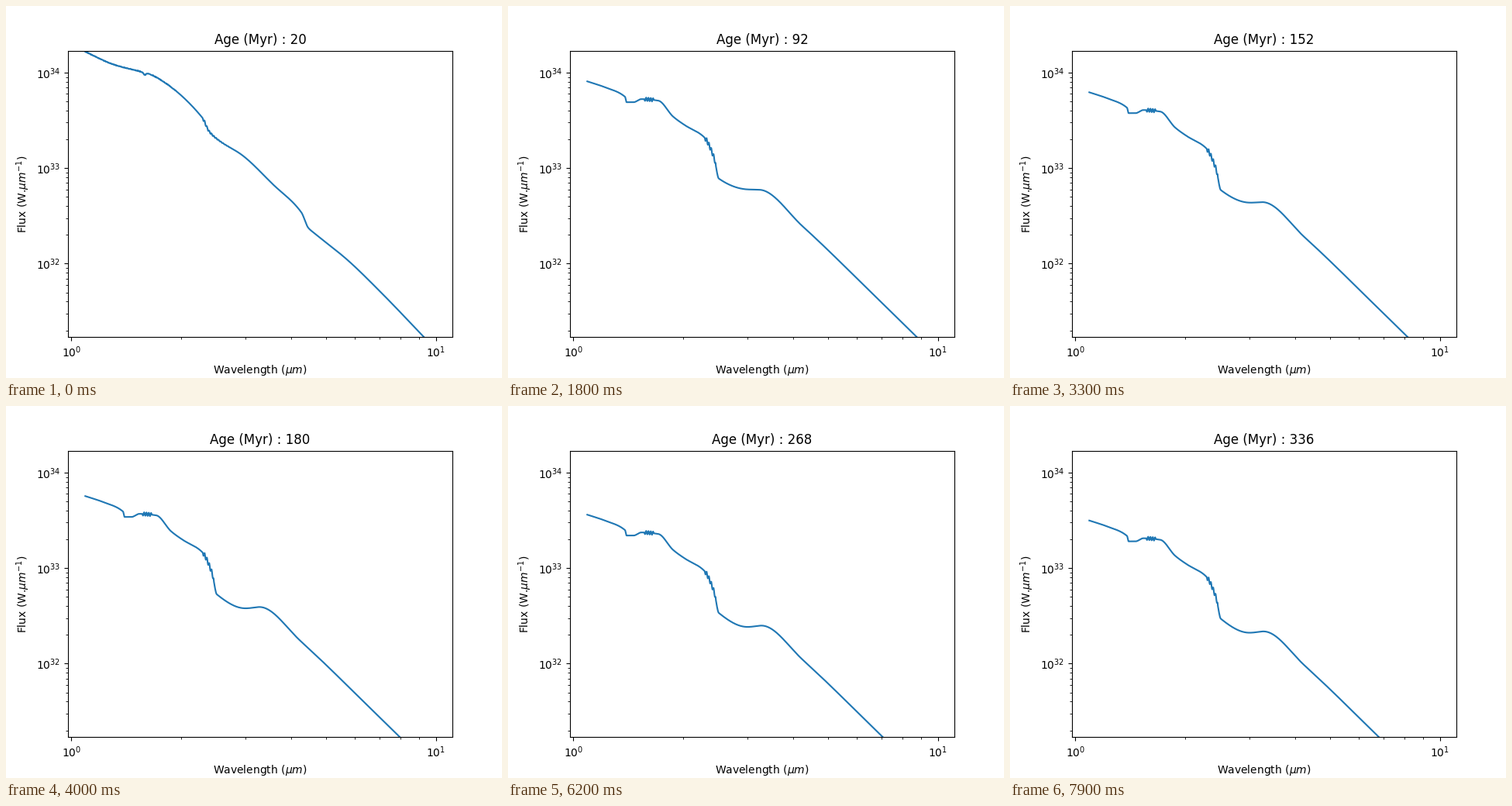
Animation of 640x480 px, one loop 8 s. Source, as a matplotlib script:

```python
import numpy as np
import matplotlib.pyplot as plt
from matplotlib.animation import FuncAnimation

FRAMES, STEP_MS = 80, 100
X0, DECADE_X = 84.3, 470.5   # screen x of 1 um, pixels per decade
Y0, DECADE_Y = 85.4, 123.2   # screen y of 1e34, pixels per decade

# Key points of the two stellar continua, in screen pixels
HOT = [(102, 111), (135, 127.5), (172, 143), (190, 150.5), (253, 205),
       (262, 223), (275, 235), (305, 254), (345, 292), (381, 327.5),
       (390, 347.5), (398, 354.5), (440, 388.5), (480, 427), (554, 504)]
COOL = [(102, 105), (126, 113), (151, 125), (153, 132), (162, 132),
        (172, 128), (194, 130), (213, 150.5), (228, 161.5), (253, 177),
        (266, 204), (272, 230.5), (309, 244.5), (325, 245), (380, 292),
        (480, 388.5), (554, 461)]

px = np.arange(102.3, 554, 0.5)


def smooth_curve(points):
    """Monotone cubic through the points, sampled at px."""
    x, y = np.array(points, float).T
    h, d = np.diff(x), np.diff(y) / np.diff(x)
    same = d[:-1] * d[1:] > 0
    inner = np.zeros(len(same))
    inner[same] = (2 * d[:-1] * d[1:])[same] / (d[:-1] + d[1:])[same]
    m = np.concatenate([d[:1], inner, d[-1:]])
    k = np.clip(np.searchsorted(x, px) - 1, 0, len(h) - 1)
    t = (px - x[k]) / h[k]
    return (y[k] + h[k] * t * (m[k] + t * (3 * d[k] - 2 * m[k] - m[k + 1]
            + t * (m[k] + m[k + 1] - 2 * d[k]))))


def bump(center, width):
    return np.exp(-((px - center) / width) ** 2)


def ripple(lo, hi, period=3):
    inside = (px >= lo) & (px <= hi)
    return inside * np.sin(2 * np.pi * (px - lo) / period)


def mix(a, b, w):
    return a + (b - a) * w


def smoothstep(t):
    t = np.clip(t, 0, 1)
    return t * t * (3 - 2 * t)


grain = np.random.default_rng(4).uniform(-0.4, 0.4, px.size) * (px < 220)
hot_base = (smooth_curve(HOT) + grain + 3 * bump(179, 2)
            + 2 * ripple(254, 288) * np.exp(-(px - 254) / 15))
hot_fall = 57.5 + 4.5 * np.tanh((px - 160) / 25)
cool_base = smooth_curve(COOL) + 2.2 * ripple(176, 188) + 3 * ripple(254, 268)
cool_dip = 5.5 * bump(305, 28)


def spectrum(i, age):
    young = 1 - np.log(age / 20) / np.log(64 / 20)
    hot = hot_base - hot_fall * max(young, 0)
    dim = np.interp(i, [20, 25, 40, 62, 79], [-8.5, 0, 10.5, 34.5, 42])
    cool = cool_base + dim + cool_dip * smoothstep((i - 25) / 15)
    return mix(hot, cool, smoothstep((i - 12) / 6))


def to_wave(x):
    return 10 ** ((x - X0) / DECADE_X)


def to_flux(y):
    return 10 ** (34 - (y - Y0) / DECADE_Y)


plt.rcParams["text.kerning_factor"] = 6
fig, ax = plt.subplots(figsize=(6.4, 4.8), dpi=100)
ax.set_xscale("log")
ax.set_yscale("log")
ax.set_xlim(to_wave(80), to_wave(576))
ax.set_ylim(1.702e31, 1.702e34)
ax.set_xlabel(r"Wavelength ($\mu m$)")
ax.set_ylabel(r"Flux (W.$\mu m^{-1}$)")
title = ax.set_title("")
line, = ax.plot(to_wave(px), to_flux(spectrum(0, 20)), color="C0")


def update(i):
    age = 20 + 4 * i
    line.set_ydata(to_flux(spectrum(i, age)))
    title.set_text(f"Age (Myr) : {age}")
    return line, title


anim = FuncAnimation(fig, update, frames=FRAMES, interval=STEP_MS,
                     repeat=True, repeat_delay=0, blit=False)
plt.show()
```
